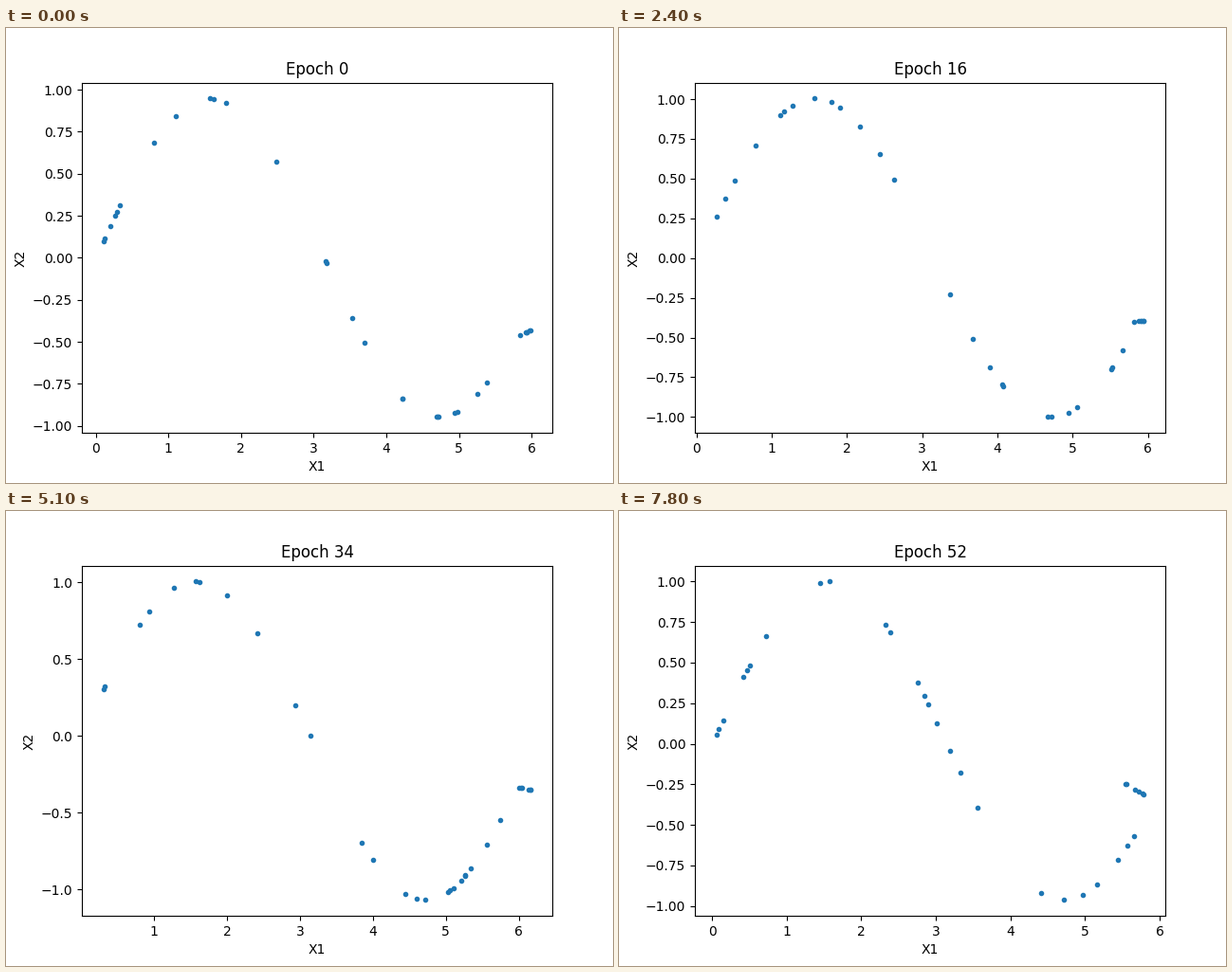
Write a matplotlib script that moves like this. It is 640 px wide and 480 px high and loops after 8000 ms.

```python
import numpy as np
import matplotlib.pyplot as plt
from matplotlib.animation import FuncAnimation

TICK_MS = 100
TICKS = 80
TICKS_PER_STEP = 3
EPOCHS_PER_STEP = 2
LAST_EPOCH = 52

# Key poses of the cloud's extent.
KEY_EPOCHS = [0, 8, 16, 26, 34, 44, 52]
LEFT = [.105, .165, .265, .155, .305, .122, .055]
RIGHT = [5.99, 6.19, 5.945, 5.935, 6.165, 5.905, 5.79]
BOTTOM = [-.948, -1.0, -1.0, -1.013, -1.07, -.927, -.963]
TOP = [.948, 1.035, 1.004, .998, 1.005, .989, 1.0]


def extent(epoch):
    return [np.interp(epoch, KEY_EPOCHS, keys)
            for keys in (LEFT, RIGHT, BOTTOM, TOP)]


def wave(left, bottom, top, rng):
    """Random samples on a sine whose two lobes reach top and bottom."""
    x = np.append([left, np.pi / 2, 3 * np.pi / 2],
                  rng.uniform(left, 5.75, 22))
    y = np.sin(x)
    return x, y * np.where(y > 0, top, -bottom)


def tail(right, progress, rng):
    """Samples crowding at the right end, folding back as training goes on."""
    reach = (.15 + .25 * progress) * np.append(0, rng.random(5) ** 2)
    level = -.43 + .12 * progress
    return right - reach, level + (.45 * progress - .2) * reach


def cloud(epoch):
    rng = np.random.default_rng(epoch)
    left, right, bottom, top = extent(epoch)
    return np.hstack([wave(left, bottom, top, rng),
                      tail(right, epoch / LAST_EPOCH, rng)])


fig, ax = plt.subplots(figsize=(6.4, 4.8), dpi=100)


def draw(tick):
    epoch = tick // TICKS_PER_STEP * EPOCHS_PER_STEP
    ax.clear()
    ax.plot(*cloud(epoch), ".", color="#1f77b4")
    ax.set_title(f"Epoch {epoch}")
    ax.set_xlabel("X1")
    ax.set_ylabel("X2")


anim = FuncAnimation(fig, draw, frames=TICKS, interval=TICK_MS,
                     init_func=lambda: None, repeat=True, repeat_delay=0)
plt.show()
```
